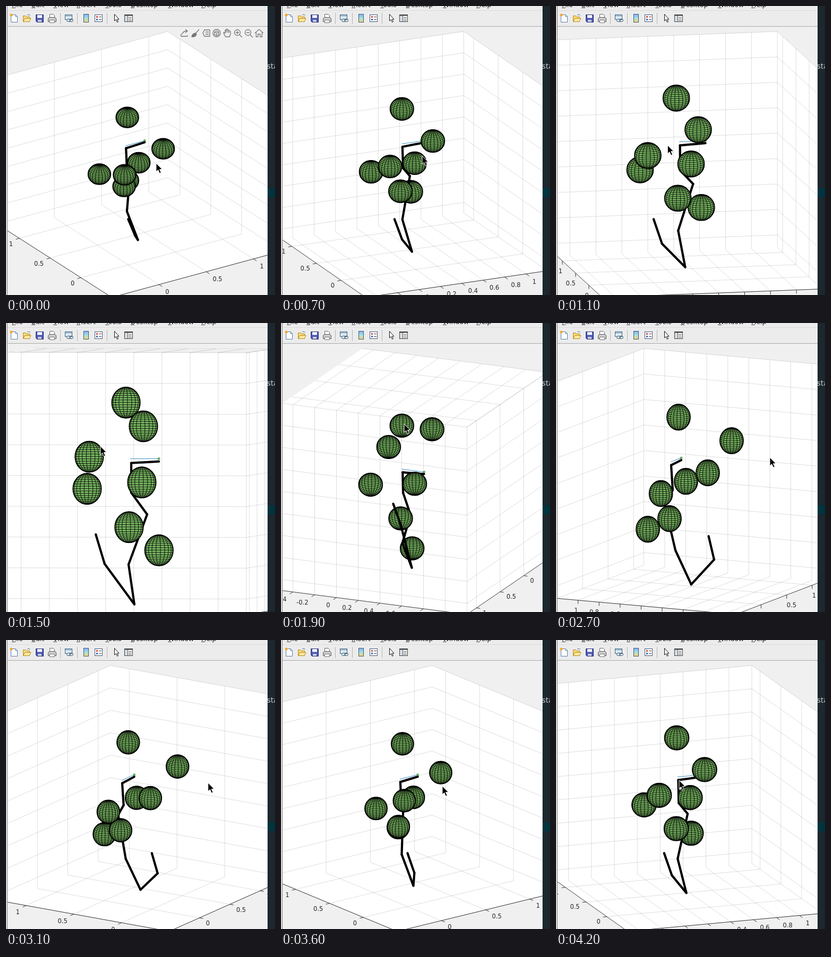
Recreate the animation shown at these times as an HTML page. Size 507 by 544 pixels, loop 4.3 s.

```html
<!DOCTYPE html>
<html lang="en">
<head>
<meta charset="utf-8">
<title>Rotating 3-D plot</title>
<style>
  html, body { margin: 0; width: 100%; height: 100%; overflow: hidden; background: #f0f0f0; }
  svg { display: block; width: 507px; height: 544px; }
  text { font-family: "DejaVu Sans", sans-serif; }
  #scene text { font-size: 11.5px; fill: #262626; }
</style>
</head>
<body>
<svg viewBox="0 0 507 544" width="507" height="544">
  <defs><clipPath id="fig"><rect x="3" y="40" width="490" height="504"/></clipPath></defs>
  <rect width="507" height="544" fill="#f0f0f0"/>
  <g id="scene" clip-path="url(#fig)"></g>

  <rect width="493" height="39" fill="#ececec"/>
  <path d="M0 38.5H493" stroke="#a9a9a9"/>
  <path d="M0 8.5H493" stroke="#dcdcdc"/>
  <g id="menu" font-size="12.5" fill="#222"></g>

  <g id="bar">
    <path d="M102.500 13V34M134.500 13V34M190.500 13V34" stroke="#b4b4b4"/>
    <g stroke="#5b7fa8">
      <path d="M9.500 16.500H18L21.500 20V30.500H9.500Z" fill="#fff"/>
      <path d="M18 16.500V20H21.500" fill="none"/>
      <circle cx="10" cy="17" r="2.500" fill="#f5a623" stroke="none"/>
    </g>
    <g stroke="#b58a1c">
      <path d="M32.500 29.500V18.500H37L39 20.500H44.500V29.500Z" fill="#f6d978"/>
      <path d="M32.500 29.500L35.500 23.500H47L44 29.500Z" fill="#ffe9a0"/>
      <path d="M40 17.500Q43 14.500 45.500 18" stroke="#467" fill="none"/>
    </g>
    <path d="M56.500 16.500H70.500V30.500H58.500L56.500 28.500Z" fill="#4a55b0" stroke="#2c3478"/>
    <path d="M59 17H68V22.500H59Z" fill="#f4f6ff"/>
    <path d="M60 26H67V30H60Z" fill="#c9cde6"/>
    <path d="M82.500 22V15.500H89L91.500 18V22" fill="#fff" stroke="#666"/>
    <path d="M79.500 23.500L82 21.500H92L94.500 23.500V29.500H79.500Z" fill="#cfcfd2" stroke="#555"/>
    <path d="M82.500 26.500H91.500V31.500H82.500Z" fill="#fff" stroke="#777"/>
    <g fill="#dcebf5" stroke="#3f5f78">
      <rect x="111.500" y="16.500" width="13" height="9"/>
      <path d="M112 18.500H124" stroke="#4a7fa8"/>
      <rect x="114.500" y="24.500" width="7" height="5" rx="2.500"/>
      <rect x="119.500" y="24.500" width="7" height="5" rx="2.500" fill="none"/>
    </g>
    <linearGradient id="hue" x2="0" y2="1">
      <stop stop-color="#7fb4f4"/><stop offset=".5" stop-color="#a5e0e0"/><stop offset="1" stop-color="#f5d56b"/>
    </linearGradient>
    <rect x="146.500" y="15.500" width="9" height="15" fill="url(#hue)" stroke="#44557a"/>
    <rect x="167.500" y="16.500" width="14" height="13" fill="#fff" stroke="#44557a"/>
    <path d="M170 19H173V22H170Z" fill="#d9432f"/>
    <path d="M170 24H173V27H170Z" fill="#3567c4"/>
    <path d="M175 20.500H180M175 25.500H180" stroke="#444"/>
    <path d="M204.500 15.500V28L207.500 25.500L209.500 30.500L211.500 29.500L209.500 25H213Z" fill="#fff" stroke="#111"/>
    <rect x="223.500" y="16.500" width="15" height="13" fill="#fff" stroke="#444"/>
    <path d="M223 17.500H239" stroke="#444" stroke-width="2"/>
    <path d="M229.500 18V30M231 21.500H237M231 24.500H237M231 27.500H237" stroke="#555"/>
    <path d="M224 19H229V29H224Z" fill="#d5dde6"/>
  </g>

  <g id="tools" fill="none" stroke="#777" stroke-width="1.300">
    <path d="M330 52V57H342V55M332 53Q334 47 341 47M338 44L342 47L338 50.500"/>
    <path d="M364 44L356 53M357 51Q351 52 350 58Q357 59 359 53Z" fill="#777"/>
    <path d="M371 51L374 45H384V57H374ZM376 49H382M376 53H382"/>
    <circle cx="397" cy="51" r="7"/><path d="M393 49L397 47L401 49V54L397 56L393 54ZM393 49L397 51L401 49M397 51V56"/>
    <path d="M414 58Q410 52 410 50Q412 49 413 52V46Q414 44 415 46V50V44Q416.500 43 417.500 44V50V45Q419 44 420 46V51V47Q422 46 423 48Q424 54 421 58Z"/>
    <circle cx="436" cy="50" r="5.500"/><path d="M440 54L445 59M433 50H439M436 47V53"/>
    <circle cx="456" cy="50" r="5.500"/><path d="M460 54L465 59M453 50H459"/>
    <path d="M469 51L477 44L485 51M471.500 50V58H475V53H479V58H482.500V50"/>
  </g>

  <path d="M1 0V544" stroke="#dcdcdc" stroke-width="2"/>
  <path d="M2.500 0V544" stroke="#8a8a8a"/>
  <rect x="493" width="14" height="544" fill="#1c272e"/>
  <rect x="493" y="343" width="14" height="17" fill="#00343f"/>
  <text x="491.500" y="118" font-size="14" fill="#c3cacb">sta</text>
  <path id="cursor" d="M0 0V16L3.700 12.600L6.500 19L9.300 17.800L6.500 11.600H11.500Z" fill="#000" stroke="#fff"/>
</svg>

<script>
const $ = id => document.getElementById(id);
const LOOP = 4300, STEP = 100;
const MID = [252, 298.2], W = 500, H = 500.5, RANGE = 1.7, h = RANGE / 2, C = 0.35, R = 0.1;

// time, azimuth, elevation, pointer x, pointer y
const KEYS = [
  [100, -33.1, 27.2, 283, 296],
  [700, -24.7, 19.3, 266, 282],
  [1500, -6.2, -0.85, 178, 232],
  [1900, -23.5, -17.7, 232, 190],
  [2700, -64.1, 9.6, 403, 253],
  [3600, -37.5, 18.3, 304, 275],
  [4200, -19.9, 15, 232, 264]
];

// positions are relative to the middle of the axes box
const BALLS = [
  [-.091, .062, .513], [-.018, -.408, .352], [.02, .045, -.006], [-.363, .098, -.047],
  [-.398, -.365, .155], [-.058, .164, -.295], [.19, .491, -.44]
];
const ARM = [
  [-.35, -.35, -.35], [-.29, -.373, -.541], [-.042, -.035, -.799], [-.068, .103, -.538],
  [.083, .279, -.21], [-.045, .14, -.071], [-.043, .156, .122], [.153, .155, .132]
];
const AIM = [[-.05, .155, .15], [.153, .155, .15]];

$("menu").innerHTML = [["File", 11], ["Edit", 48], ["View", 89], ["Insert", 133],
  ["Tools", 187], ["Desktop", 235], ["Window", 305], ["Help", 368]]
  .map(([s, x]) => `<text x="${x}" y="1.5">${s}</text><path d="M${x} 3.500h7" stroke="#444"/>`).join("");

function slope(i, c) {
  const rise = j => (KEYS[j + 1][c] - KEYS[j][c]) / (KEYS[j + 1][0] - KEYS[j][0]);
  if (i === 0) return rise(0);
  if (i === KEYS.length - 1) return rise(i - 1);
  const a = KEYS[i][0] - KEYS[i - 1][0], b = KEYS[i + 1][0] - KEYS[i][0];
  return (rise(i - 1) * b + rise(i) * a) / (a + b);
}

function sample(t, c) {
  let i = 0;
  while (i < KEYS.length - 2 && t >= KEYS[i + 1][0]) i++;
  const p = KEYS[i], q = KEYS[i + 1], d = q[0] - p[0], k = (t - p[0]) / d, m = 1 - k;
  return m * m * (1 + 2 * k) * p[c] + k * k * (1 + 2 * m) * q[c]
    + k * m * d * (m * slope(i, c) - k * slope(i + 1, c));
}

function makeView(az, el) {
  const r = Math.PI / 180, c = Math.cos(az * r), s = Math.sin(az * r);
  const ce = Math.cos(el * r), se = Math.sin(el * r), span = Math.abs(c) + Math.abs(s);
  const a = W / RANGE / span, b = H / RANGE / (ce + Math.abs(se) * span);
  return {
    a, b, c, s, el,
    flat: (u, v, w) => [a * (c * u + s * v), -b * (se * (c * v - s * u) + ce * w)],
    at(u, v, w) { const p = this.flat(u, v, w); return [p[0] + MID[0], p[1] + MID[1]]; },
    depth: (u, v, w) => ce * (s * u - c * v) + se * w
  };
}

const xy = p => p[0].toFixed(1) + " " + p[1].toFixed(1);
const poly = pts => "M" + pts.map(xy).join("L");

function ticks(step) {
  const out = [];
  for (let i = Math.ceil(-.5 / step); i * step < 1.2001; i++) out.push(i * step);
  return out;
}

function drawAxes(V) {
  const P = (...q) => V.at(...q), up = V.el > 0;
  const bu = V.s < 0 ? h : -h, bv = V.c > 0 ? h : -h, bw = up ? -h : h;
  const size = d => Math.hypot(...V.flat(...d));
  const xt = ticks(size([1, 0, 0]) > 188 ? .2 : .5), yt = ticks(size([0, 1, 0]) > 188 ? .2 : .5);
  const quad = f => poly([f(-h, -h), f(h, -h), f(h, h), f(-h, h)]) + "Z";
  const walls = quad((i, j) => P(bu, i, j)) + quad((i, j) => P(i, bv, j)) + quad((i, j) => P(i, j, bw));
  let grid = "", rule = "", text = "";
  const line = (p, q) => poly([p, q]);
  for (const x of xt) {
    const u = x - C;
    grid += line(P(u, bv, -h), P(u, bv, h)) + line(P(u, -h, bw), P(u, h, bw));
  }
  for (const y of yt) {
    const v = y - C;
    grid += line(P(bu, v, -h), P(bu, v, h)) + line(P(-h, v, bw), P(h, v, bw));
  }
  for (const z of ticks(.2)) {
    const w = z - C;
    grid += line(P(-h, bv, w), P(h, bv, w)) + line(P(bu, -h, w), P(bu, h, w));
  }
  const ruler = (list, spot, edge) => {
    rule += line(spot(-h, edge), spot(h, edge));
    const o = spot(0, edge), e = spot(0, edge * 1.2), n = Math.hypot(e[0] - o[0], e[1] - o[1]);
    const side = Math.sign(e[0] - o[0]), low = Math.abs(V.el) < 12;
    const d = low ? [0, 1] : [(e[0] - o[0]) / n, (e[1] - o[1]) / n];
    for (const k of list) {
      const p = spot(k - C, edge);
      rule += line(p, [p[0] + 7 * d[0], p[1] + 7 * d[1]]);
      const x = p[0] + (low ? 0 : 12 * side), y = p[1] + 12 + 11 * d[1];
      text += `<text x="${x.toFixed(1)}" y="${y.toFixed(1)}" text-anchor="${side > 0 ? "start" : "end"}">${+k.toFixed(1)}</text>`;
    }
  };
  ruler(xt, (u, v) => P(u, v, -h), up ? -bv : bv);
  ruler(yt, (v, u) => P(u, v, -h), up ? -bu : bu);
  return `<path d="${walls}" fill="#fff"/><path d="${grid}" fill="none" stroke="#000" stroke-opacity=".15" stroke-width=".9"/>`
    + `<path d="${rule}" fill="none" stroke="#262626" stroke-width=".9"/>` + text;
}

// front half of a 20 by 20 wire mesh, shared by all balls
function meshPath(V) {
  let d = "";
  const pt = (i, j) => {
    const lat = (i / 20 - .5) * Math.PI, lon = j / 10 * Math.PI;
    return [R * Math.cos(lat) * Math.cos(lon), R * Math.cos(lat) * Math.sin(lon), R * Math.sin(lat)];
  };
  const edge = (p, q) => {
    if (V.depth(...p) + V.depth(...q) > 0) d += poly([V.flat(...p), V.flat(...q)]);
  };
  for (let i = 0; i < 20; i++) for (let j = 0; j < 20; j++) {
    edge(pt(i, j), pt(i + 1, j));
    if (i) edge(pt(i, j), pt(i, j + 1));
  }
  return d;
}

function drawBodies(V) {
  const items = [], mesh = meshPath(V);
  const add = (p, svg) => items.push([V.depth(...p), svg]);
  const mid = (p, q) => p.map((n, i) => (n + q[i]) / 2);
  for (const p of BALLS) add(p, `<g transform="translate(${xy(V.at(...p))})" stroke="#000">`
    + `<ellipse rx="${R * V.a}" ry="${R * V.b}" fill="#78b761" stroke-width="1.8"/>`
    + `<path d="${mesh}" fill="none" stroke-width=".9"/></g>`);
  for (let i = 1; i < ARM.length; i++) {
    const p = ARM[i - 1], q = ARM[i];
    add(mid(p, q), `<path d="${poly([V.at(...p), V.at(...q)])}" stroke="#000" stroke-width="4.2" stroke-linecap="round"/>`);
  }
  add(mid(...AIM), `<path d="${poly(AIM.map(p => V.at(...p)))}" stroke="#3a8fc8" stroke-width="1"/>`);
  const [x, y] = V.at(...AIM[1]);
  add(AIM[1], `<rect x="${x - 2.2}" y="${y - 2.2}" width="4.5" height="4.5" rx="1" fill="#6fae55"/>`);
  return items.sort((m, n) => m[0] - n[0]).map(m => m[1]).join("");
}

let shown = -1;
function render(now) {
  const step = Math.max(1, Math.floor(now % LOOP / STEP));
  if (step !== shown) {
    shown = step;
    const t = step * STEP, V = makeView(sample(t, 1), sample(t, 2));
    $("scene").innerHTML = drawAxes(V) + drawBodies(V);
    $("cursor").setAttribute("transform", `translate(${sample(t, 3).toFixed(1)} ${sample(t, 4).toFixed(1)})`);
    $("tools").style.display = step < 2 ? "" : "none";
  }
}

const start = performance.now();
function loop() {
  render(performance.now() - start);
  requestAnimationFrame(loop);
}
loop();
</script>
</body>
</html>
```
